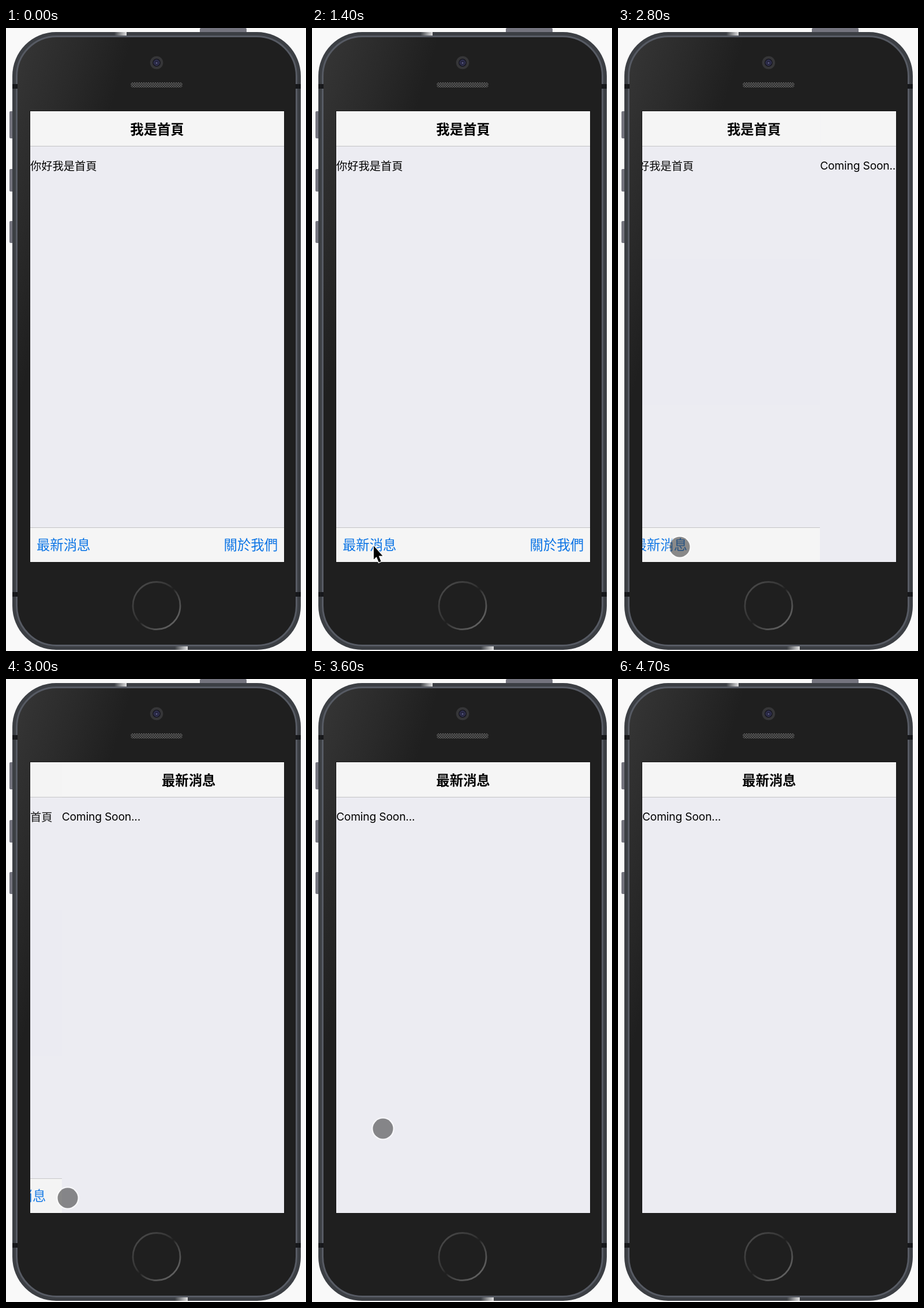
Recreate the animation shown at these times as an HTML page. Size 520 px wide and 1078 px high, loop 6300 ms.

```html
<!DOCTYPE html>
<html lang="zh-Hant">
<head>
<meta charset="utf-8">
<title>Page transition</title>
<style>
  html, body { margin: 0; width: 100%; height: 100%; overflow: hidden; background: #f9f9f9; }
  #stage { display: block; width: 520px; height: 1078px; }
  text { font: 19.25px Inter, "Noto Sans CJK TC", "Noto Sans CJK", sans-serif; }
  .title { font-size: 23.375px; font-weight: 700; text-anchor: middle; }
  .link { font-size: 23.375px; fill: #0b74e5; }
  .latin { letter-spacing: -.2px; }
  .page { fill: #ececf2; }
  .bar { fill: #f5f5f5; }
  .line { fill: #c3c3c5; }
  .button { fill: #74747e; }
  .break { fill: #17181b; }
</style>
</head>
<body>
<svg id="stage" viewBox="0 0 520 1078">
  <defs>
    <linearGradient id="glare" gradientUnits="userSpaceOnUse" x1="20" y1="16" x2="203" y2="74">
      <stop offset="0" stop-color="#363636"/>
      <stop offset=".55" stop-color="#2a2a2a"/>
      <stop offset="1" stop-color="#1f1f1f"/>
    </linearGradient>
    <linearGradient id="glint">
      <stop offset="0" stop-color="#3e4146"/>
      <stop offset=".65" stop-color="#aaabad"/>
      <stop offset="1" stop-color="#dededf"/>
    </linearGradient>
    <linearGradient id="homeRing" x1=".1" y1=".1" x2=".9" y2=".9">
      <stop offset="0" stop-color="#484848"/>
      <stop offset=".42" stop-color="#333"/>
      <stop offset=".5" stop-color="#1f1f1f"/>
      <stop offset=".58" stop-color="#3c3c3c"/>
      <stop offset="1" stop-color="#646464"/>
    </linearGradient>
    <pattern id="mesh" width="4" height="4" patternUnits="userSpaceOnUse">
      <rect width="4" height="4" fill="#282828"/>
      <path d="M0 0h2v2h-2zM2 2h2v2h-2z" fill="#5c5c5c"/>
    </pattern>
  </defs>

  <!-- Phone -->
  <g class="button">
    <rect x="336" width="81" height="10" rx="2"/>
    <rect x="6" y="144" width="8" height="47" rx="2"/>
    <rect x="6" y="244" width="8" height="39" rx="2"/>
    <rect x="6" y="334" width="8" height="38" rx="2"/>
  </g>
  <rect x="11" y="7" width="500" height="1069" rx="76" fill="#3c3f44"/>
  <rect x="18.5" y="14.5" width="485" height="1054" rx="69" fill="url(#glare)" stroke="#575b64" stroke-width="3"/>
  <path class="break" d="M11 97h9v8h-9zM502 97h9v8h-9zM11 976h9v8h-9zM502 976h9v8h-9z"/>
  <rect x="188" y="7" width="21" height="6" fill="url(#glint)"/>
  <rect x="293" y="1070" width="22" height="6" fill="url(#glint)"/>

  <circle cx="261" cy="60" r="11.3" fill="#363638"/>
  <circle cx="261" cy="60" r="7" fill="#191923"/>
  <circle cx="261" cy="60" r="4.6" fill="#25253f" stroke="#3d3d66"/>
  <circle cx="261" cy="60.5" r="1.5" fill="#5b5b82"/>
  <rect x="216" y="94" width="90" height="9" rx="4.5" fill="url(#mesh)"/>
  <circle cx="261" cy="999.5" r="41" fill="none" stroke="url(#homeRing)" stroke-width="2.8"/>
  <rect x="41.5" y="143.5" width="441" height="781" fill="#fff" stroke="#171717"/>

  <!-- Screen -->
  <svg x="42" y="144" width="440" height="780" overflow="hidden">
    <rect class="page" width="440" height="780"/>
    <g id="home">
      <rect class="page" width="440" height="780"/>
      <rect class="bar" width="440" height="60"/>
      <rect class="line" y="60" width="440" height="1"/>
      <text class="title" x="220" y="40">我是首頁</text>
      <text y="102">你好我是首頁</text>
      <rect class="bar" y="720" width="440" height="60"/>
      <rect class="line" y="720" width="440" height="1"/>
      <text class="link" x="11" y="759">最新消息</text>
      <text class="link" x="429" y="759" text-anchor="end">關於我們</text>
    </g>
    <g id="news">
      <rect class="page" width="440" height="780"/>
      <rect class="bar" width="440" height="60"/>
      <rect class="line" y="60" width="440" height="1"/>
      <text class="title" x="220" y="40">最新消息</text>
      <text class="latin" y="101">Coming Soon...</text>
    </g>
  </svg>

  <!-- Pointers, drawn around their own origin -->
  <path id="arrow" d="M2 2v23.5l4.8-4.6 4 9.6 3.8-1.6-3.9-9.3h6.7z"
        stroke="#fff" stroke-width="2.6" paint-order="stroke"/>
  <g id="touch">
    <circle r="18.6" fill="none" stroke="#fff" stroke-opacity=".6" stroke-width="2.4"/>
    <circle r="17.5" fill="#3c3c3c" fill-opacity=".58"/>
  </g>
</svg>

<script>
  const LOOP = 6300, TICK = 100;
  const tracks = [];

  // Each key is [ms, value, easing towards the next key].
  function track(id, property, keys) {
    const ends = [[0, keys[0][1]], ...keys, [LOOP, keys.at(-1)[1]]];
    const frames = ends.map(([ms, value, easing = 'linear']) =>
      ({ offset: ms / LOOP, [property]: value, easing }));
    const animation = document.getElementById(id).animate(frames, { duration: LOOP, fill: 'both' });
    animation.pause();
    tracks.push(animation);
  }

  const at = (x, y) => `translate(${x}px, ${y}px)`;
  const visible = (id, from, to) =>
    track(id, 'opacity', [[0, 0, 'step-end'], [from, 1, 'step-end'], [to, 0]]);

  visible('arrow', 100, 2300);
  track('arrow', 'transform', [[200, at(173, 962), 'ease-in-out'], [900, at(105, 894)]]);

  visible('touch', 2300, 4700);
  track('touch', 'transform', [
    [3200, at(107, 898), 'ease-in-out'],
    [3600, at(123, 778), 'ease-in-out'],
    [4000, at(152, 795)],
    [4100, at(152, 795)],
    [4200, at(152, 794)],
    [4300, at(152, 794), 'ease-in'],
    [4600, at(435, 384)]
  ]);

  const SLIDE = [2696, 3216];
  const slide = (id, property, from, to) =>
    track(id, property, [[SLIDE[0], from, 'ease'], [SLIDE[1], to]]);
  slide('home', 'transform', at(0, 0), at(-88, 0));
  slide('home', 'opacity', 1, .9);
  slide('news', 'transform', at(440, 0), at(0, 0));

  // The picture advances ten times a second; +1 keeps clear of key boundaries.
  const start = performance.now();
  function draw() {
    const now = (performance.now() - start) % LOOP;
    const time = Math.floor(now / TICK) * TICK + 1;
    for (const animation of tracks) animation.currentTime = time;
    requestAnimationFrame(draw);
  }
  draw();
</script>
</body>
</html>
```
